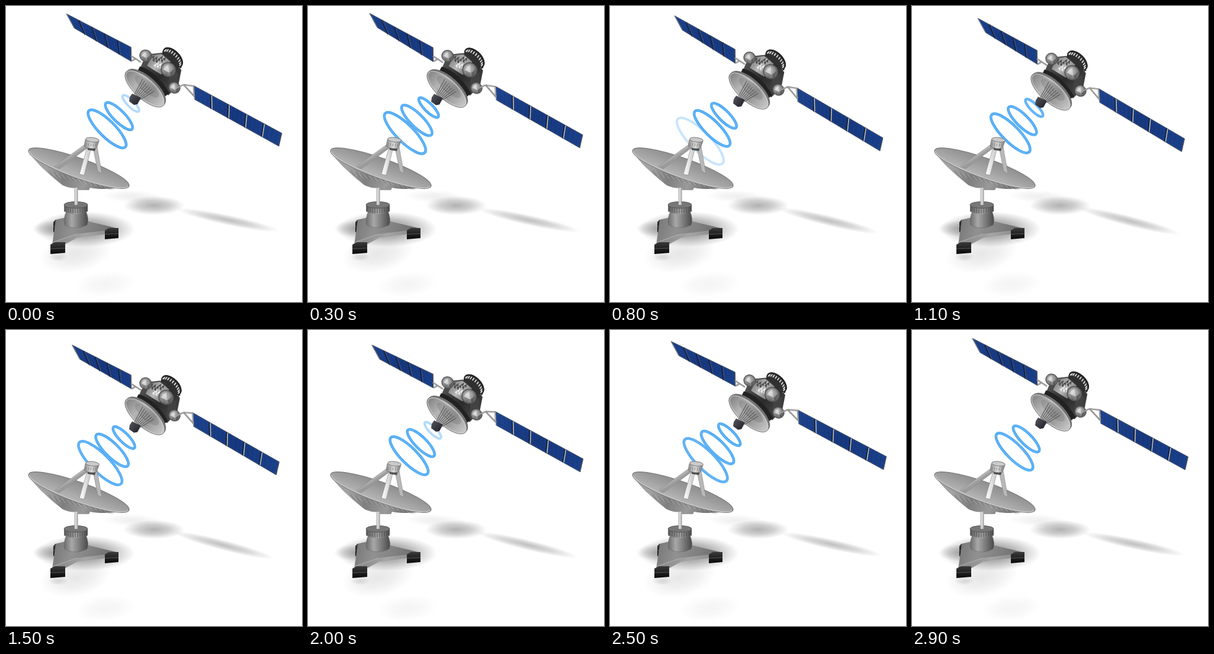
Recreate the animation shown at these times as an HTML page with a canvas. Size 500 by 500 pixels, loop 3 s.

```html
<!DOCTYPE html>
<html lang="en">
<head>
<meta charset="utf-8">
<title>Satellite link</title>
<style>
  html, body { margin: 0; width: 100%; height: 100%; overflow: hidden; background: #fff; }
  canvas { display: block; width: 500px; height: 500px; }
</style>
</head>
<body>
<canvas id="stage" width="500" height="500"></canvas>
<script>
const ctx = document.getElementById('stage').getContext('2d');
const LOOP = 3000, STEP = 100;

// ---- helpers ----
const lerp = (a, b, k) => a + (b - a) * k;
const mix = (p, q, k) => [lerp(p[0], q[0], k), lerp(p[1], q[1], k)];
const clamp = v => Math.max(0, Math.min(1, v));

function gradient(x0, y0, x1, y1, ...colors) {
  const g = ctx.createLinearGradient(x0, y0, x1, y1);
  colors.forEach((c, i) => g.addColorStop(i / (colors.length - 1), c));
  return g;
}

function paint(fill, stroke, width = 1) {
  if (fill) { ctx.fillStyle = fill; ctx.fill(); }
  if (stroke) { ctx.strokeStyle = stroke; ctx.lineWidth = width; ctx.stroke(); }
}

function poly(points, fill, stroke, width) {
  ctx.beginPath();
  points.forEach(p => ctx.lineTo(p[0], p[1]));
  ctx.closePath();
  paint(fill, stroke, width);
}

function line(a, b, color, width = 1) {
  ctx.beginPath();
  ctx.moveTo(a[0], a[1]);
  ctx.lineTo(b[0], b[1]);
  paint(null, color, width);
}

function oval(x, y, rx, ry, angle, fill, stroke, width) {
  ctx.beginPath();
  ctx.ellipse(x, y, rx, ry, angle, 0, Math.PI * 2);
  paint(fill, stroke, width);
}

function shape(path, fill, stroke, width) {
  const p = new Path2D(path);
  if (fill) { ctx.fillStyle = fill; ctx.fill(p); }
  if (stroke) { ctx.strokeStyle = stroke; ctx.lineWidth = width || 1; ctx.stroke(p); }
}

function softOval(x, y, rx, ry, angle, alpha) {
  ctx.save();
  ctx.translate(x, y);
  ctx.rotate(angle);
  ctx.scale(rx, ry);
  const g = ctx.createRadialGradient(0, 0, 0, 0, 0, 1);
  g.addColorStop(0, `rgba(70,70,70,${alpha})`);
  g.addColorStop(0.5, `rgba(80,80,80,${alpha * 0.65})`);
  g.addColorStop(1, 'rgba(90,90,90,0)');
  oval(0, 0, 1, 1, 0, g);
  ctx.restore();
}

// ---- ground station ----
function groundShadows(wave) {
  softOval(133, 377, 85, 30, 0, 0.62);
  softOval(78, 376, 34, 14, 0, 0.3);
  softOval(215, 322, 52, 11, 0.05, 0.09);
  softOval(118, 418, 62, 32, -0.2, 0.13);
  softOval(168, 470, 52, 22, -0.1, 0.06);
  softOval(88, 424, 17, 7, 0, 0.15);

  softOval(250, 337, 52, 16, 0, 0.42);
  const end = [450 + 8 * wave(2800), 381 - 2 * wave(0)];
  const start = [292, 344];
  const mid = mix(start, end, 0.5);
  const angle = Math.atan2(end[1] - start[1], end[0] - start[0]);
  softOval(mid[0], mid[1], 88, 9, angle, 0.34);
}

function foot(x, y, w, h) {
  poly([[x, y + 4], [x + w * 0.3, y], [x + w, y], [x + w, y + h - 2], [x, y + h]],
    gradient(x, y, x, y + h, '#3a3a3a', '#090909'));
  line([x, y + h * 0.55], [x + w, y + h * 0.5], '#555', 1);
}

function groundBase() {
  foot(80, 361, 12, 21);
  poly([[84, 361], [102, 357], [140, 364], [186, 375], [187, 382], [121, 391], [97, 403], [78, 404]],
    gradient(80, 360, 180, 390, '#777', '#919191', '#808080', '#6c6c6c'));
  poly([[79, 399], [120, 385], [187, 377], [187, 383], [121, 391], [97, 404], [78, 404]],
    gradient(80, 0, 187, 0, '#858585', '#a5a5a5', '#858585'));
  line([80, 399], [120, 385], '#b5b5b5', 1);
  foot(75, 399, 25, 20);
  foot(167, 375, 23, 19);

  const steel = gradient(97, 0, 139, 0, '#666', '#a8a8a8', '#787878', '#484848');
  shape('M103 344 L134 344 Q141 360 137 370 Q118 380 99 370 Q96 360 103 344 Z', steel, '#6b6b6b', 0.6);
  shape('M98 336 L98 347 Q118 356 138 347 L138 336 Z', gradient(98, 0, 138, 0, '#606060', '#a4a4a4', '#484848'));
  for (let x = 101; x < 138; x += 4) {
    const drop = 4 * Math.sin((x - 98) / 40 * Math.PI);
    line([x, 337 + drop], [x, 346 + drop], '#505050', 1);
  }
  oval(118, 336, 20, 5.5, 0, '#777', '#565656', 1);
  ctx.fillStyle = gradient(114, 0, 122, 0, '#888', '#e5e5e5', '#888');
  ctx.fillRect(115.5, 308, 6, 28);
}

function groundDish() {
  shape('M38 245 C48 263 72 284 96 303 Q110 309 120 307 L122 311 L140 311 L142 307 Q165 312 208 305 L208 301 L120 282 Z',
    gradient(70, 270, 165, 312, '#a2a2a2', '#7f7f7f', '#9a9a9a', '#707070'));
  for (let i = 0; i < 24; i++) {
    const x = 72 + i * 4.4, y = 278 + i * 1.25;
    line([x, y], [x + 7, y + 9 - i * 0.22], i % 2 ? '#b2b2b2' : '#727272', 0.8);
  }
  oval(123, 274, 90, 17, 0.343,
    gradient(130, 256, 117, 290, '#8c8c8c', '#a0a0a0', '#b7b7b7'), '#777', 1.2);
  ctx.beginPath();
  ctx.ellipse(123, 274, 88.5, 15.8, 0.343, 0.05, Math.PI - 0.05);
  paint(null, '#c9c9c9', 1.4);

  poly([[133, 234], [140, 238], [90, 275], [82, 271]], gradient(85, 260, 91, 269, '#dedede', '#9b9b9b'), '#858585', 0.6);
  poly([[147, 239], [154, 238], [162, 283], [155, 279]], '#b8b8b8', '#858585', 0.6);
  poly([[137, 239], [144, 239], [132, 286], [124, 284]], gradient(128, 0, 139, 0, '#f5f5f5', '#d2d2d2'), '#8d8d8d', 0.7);
  poly([[137, 236], [152, 238], [150, 245], [138, 243]], '#4b4b4b');
  shape('M134 226 L132 237 Q143 243 153 240 L157 228 Z', gradient(132, 0, 157, 0, '#8b8b8b', '#ddd', '#777'), '#777', 0.8);
  oval(146, 226, 11.5, 3.8, 0.12, '#cacaca', '#777', 1);
  for (let i = 0; i < 5; i++) line([136 + i * 4, 231 + i * 0.5], [135 + i * 4, 236 + i * 0.5], '#777', 0.8);
}

// ---- satellite ----
function sphere(x, y, r) {
  const g = ctx.createRadialGradient(x - r * 0.3, y - r * 0.3, 1, x, y, r);
  g.addColorStop(0, '#c8c8c8');
  g.addColorStop(0.6, '#949494');
  g.addColorStop(1, '#4f4f4f');
  oval(x, y, r, r * 0.94, 0.6, g, '#4b4b4b', 0.8);
  poly([[x - r * 0.7, y], [x, y - r * 0.7], [x + r * 0.15, y + r * 0.4]], 'rgba(255,255,255,.4)');
  poly([[x + r * 0.15, y + r * 0.4], [x + r * 0.8, y - r * 0.1], [x + r * 0.4, y + r * 0.8]], 'rgba(50,50,50,.45)');
  poly([[x - r * 0.7, y], [x + r * 0.15, y + r * 0.4], [x - r * 0.3, y + r * 0.85]], 'rgba(60,60,60,.25)');
}

function panel([tl, tr, br, bl], seam) {
  poly([tl, tr, br, bl], gradient(tl[0], tl[1], br[0], br[1], '#1f4690', '#17397f', '#1b428c'));
  for (let i = 1; i < 20; i++) {
    if (i % 4) line(mix(tl, tr, i / 20), mix(bl, br, i / 20), 'rgba(10,30,90,.25)', 0.7);
  }
  for (let i = 1; i < 4; i++) line(mix(tl, bl, i / 4), mix(tr, br, i / 4), 'rgba(12,32,92,.25)', 0.7);
  for (let i = 1; i < 5; i++) {
    const a = mix(tl, tr, i / 5), b = mix(bl, br, i / 5);
    line([a[0] - 1, a[1]], [b[0] - 1, b[1]], '#14213f', 2);
    line([a[0] + 0.8, a[1]], [b[0] + 0.8, b[1]], seam, 1.5);
  }
  poly([tl, tr, br, bl], null, '#4a5164', 1);
  line(tl, bl, '#777d88', 1.4);
  line(tr, br, '#4c4e54', 1.4);
}

function panels(wave, oy) {
  const tip = [107 + 5 * wave(1350), 19.3 + 7 * wave(1750)];
  panel([tip, [211, 69.5 + oy], [211.5, 93.5 + oy * 0.9], [tip[0] + 13, tip[1] + 24]], '#3a4d7c');

  const far = [463.5 + 3.3 * wave(2600), 218.7 + 5.3 * wave(1150)];
  const near = [316 + wave(2700), 137 + 2.7 * wave(1350)];
  panel([near, far, [far[0] - 5, far[1] + 22], [near[0] + 2, near[1] + 23.5]], '#c9c4b6');

  const joint = [300, 133 + oy];
  for (const [a, b] of [
    [[211, 84 + oy], [228, 95 + oy]], [[212, 93 + oy], [219, 89 + oy]],
    [joint, [near[0] + 1, near[1] + 1]], [joint, [near[0] + 1, near[1] + 18]],
    [[near[0], near[1] + 1], [near[0] + 1, near[1] + 19]], [joint, [289, 138 + oy]]
  ]) {
    line(a, b, '#777', 2.4);
    line(a, b, '#c5c5c5', 1);
  }
}

function crown() {
  shape('M265 77 L260 88 L288 111 L297 103 Z', '#282828');
  oval(281.5, 87, 20, 11, 0.78, '#303030', '#222', 2);
  for (let i = 0; i < 13; i++) {
    const a = -3 + i * 0.26, c = Math.cos(0.78), s = Math.sin(0.78);
    const u = 19 * Math.cos(a), v = 10 * Math.sin(a);
    const x = 281.5 + u * c - v * s, y = 87 + u * s + v * c;
    line([x - 1, y + 1], [x - 4, y + 5], '#e0e0e0', 1.8);
  }
  oval(281.5, 87, 20, 11, 0.78, null, '#242424', 2);
}

function body(sway) {
  ctx.save();
  ctx.translate(sway, 0);
  crown();
  poly([[244, 81], [263, 79], [296, 108], [291, 134], [274, 151], [226, 106], [231, 94]],
    gradient(235, 85, 290, 145, '#555', '#2b2b2b', '#4a4a4a'));
  poly([[247, 83], [262, 81], [278, 94], [262, 116], [238, 101]],
    gradient(240, 85, 272, 113, '#777', '#b9b9b9', '#626262'));
  for (let i = 0; i < 16; i++) {
    const x = 246 + (i * 7) % 23, y = 86 + (i * 11) % 21;
    poly([[x, y], [x + 5, y - 3], [x + 3, y + 4]], i % 2 ? '#ececec' : '#4d4d4d');
  }
  poly([[276, 119], [290, 111], [289, 128], [273, 139]], '#424242');
  shape('M226 102 Q253 109 276 147 L267 154 Q249 122 222 110 Z', '#222');
  ctx.restore();
  sphere(236, 84, 10.5);
  sphere(274 + sway * 1.6, 107.5, 13);
  sphere(284.5, 138, 10);
}

function spaceDish() {
  oval(236.5, 137.5, 42.5, 18, 0.735, '#707070');
  oval(234.5, 139.5, 42.5, 17.5, 0.735,
    gradient(207, 110, 262, 165, '#858585', '#b5b5b5', '#989898', '#c2c2c2'), '#777', 1);
  oval(234.5, 139.5, 40.8, 15.8, 0.735, null, 'rgba(215,215,215,.7)', 1.2);
  oval(238, 136, 26, 9, 0.735, 'rgba(95,95,95,.25)');
  for (let i = 0; i < 7; i++) {
    line([231 + i * 3.2, 123 + i * 3.5], [216 + i * 1.8, 151 + i * 1.2], '#4b4b4b', 1);
  }
  line([227, 138], [239, 148], '#666', 0.9);
  line([230, 130], [245, 143], '#777', 0.9);
  poly([[213, 148], [228, 155], [222, 166], [216, 167], [208, 161], [209, 154]],
    gradient(210, 150, 225, 165, '#51515a', '#24242b'));
}

// ---- signal ----
function rings(t, ox, oy) {
  const phase = (t / 1000 + 0.05) % 1;
  for (let k = 0; k < 3; k++) {
    const p = phase + k, half = 13.5 + 9.1 * p;
    const x = 212 - 20 * p + ox, y = 163.5 + 21.5 * p + oy;
    ctx.globalAlpha = clamp(p * 5.5) * clamp((2.93 - p) / 0.42);
    const hoop = (color, width) => oval(x, y, half * 1.35, half * 0.42, Math.PI / 4, null, color, width);
    hoop('rgba(130,200,255,.45)', 5.8);
    hoop('#3499f0', 3.8);
    hoop('#7cc5fb', 1.3);
  }
  ctx.globalAlpha = 1;
}

function draw(t) {
  const wave = peak => Math.cos((t - peak) / LOOP * Math.PI * 2);
  const oy = 3.2 + 3.2 * wave(1500);
  ctx.fillStyle = '#fff';
  ctx.fillRect(0, 0, 500, 500);
  ctx.lineJoin = 'round';

  groundShadows(wave);
  groundBase();
  rings(t, -1 + 1.6 * wave(2500), oy);

  ctx.save();
  ctx.translate(0, oy);
  body(-1 + 1.3 * wave(2800));
  spaceDish();
  ctx.restore();
  panels(wave, oy);
  groundDish();
}

const begin = performance.now();
function tick(now) {
  const elapsed = Math.max(0, now - begin) % LOOP;
  draw(Math.floor(elapsed / STEP) * STEP);
  requestAnimationFrame(tick);
}
draw(0);
requestAnimationFrame(tick);
</script>
</body>
</html>
```
